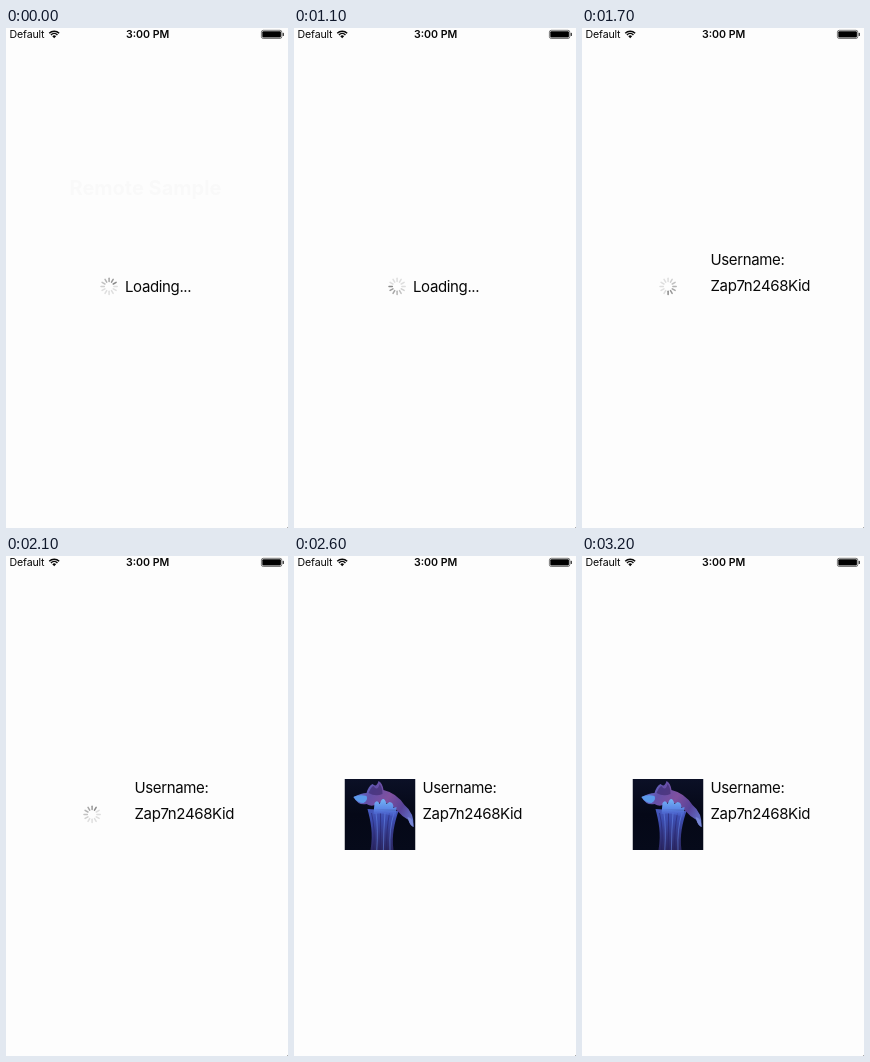
Recreate the animation shown at these times as an HTML page with a canvas. Size 282x500 px, loop 3400 ms.

```html
<!DOCTYPE html>
<html lang="en">
<head>
<meta charset="utf-8">
<title>Loading a profile</title>
<style>
  html, body { margin: 0; width: 100%; height: 100%; overflow: hidden; background: #fdfdfd; }
  canvas, svg { position: absolute; left: 0; top: 0; width: 282px; height: 500px; }
  text { font-family: Inter, "Liberation Sans", sans-serif; fill: #080808; }
  .bar { font-size: 10.6px; }
  .body { font-size: 15px; letter-spacing: -0.36px; }
</style>
</head>
<body>
<canvas id="stage"></canvas>
<svg viewBox="0 0 282 500">
  <text class="bar" x="3.5" y="10.4" letter-spacing="-0.15">Default</text>
  <text class="bar" x="141.7" y="10.4" text-anchor="middle" font-weight="600">3:00 PM</text>
  <text id="ghost" x="139.5" y="167" text-anchor="middle" font-size="20" font-weight="700" style="fill:#f9f9f9">Remote Sample</text>
  <text id="loading" class="body" x="119" y="264">Loading...</text>
  <g id="user">
    <text class="body" x="128.5" y="237.3">Username:</text>
    <text class="body" x="128.5" y="262.8">Zap7n2468Kid</text>
  </g>
</svg>
<script>
const W = 282, H = 500, LOOP = 3400, STEP = 100;
const USER_AT = 1200, PHOTO_AT = 2600;
const SPOKES = 12, SPOKES_PER_STEP = 1.78;

const $ = id => document.getElementById(id);
const canvas = $('stage');
const ctx = canvas.getContext('2d');
const ratio = window.devicePixelRatio || 1;
canvas.width = W * ratio;
canvas.height = H * ratio;
ctx.scale(ratio, ratio);

function show(id, on) {
  $(id).style.visibility = on ? 'visible' : 'hidden';
}

function box(x, y, w, h, r, color) {
  ctx.fillStyle = color;
  ctx.beginPath();
  ctx.roundRect(x, y, w, h, r);
  ctx.fill();
}

function gradient(x0, y0, x1, y1, colors) {
  const g = ctx.createLinearGradient(x0, y0, x1, y1);
  colors.forEach((c, i) => g.addColorStop(i / (colors.length - 1), c));
  return g;
}

function shape(path, fill) {
  ctx.fillStyle = fill;
  ctx.fill(new Path2D(path));
}

function statusBar() {
  // Wi-Fi fan
  const cx = 48.2, cy = 10.2, a = Math.PI * 0.25;
  ctx.strokeStyle = '#080808';
  ctx.lineWidth = 1.5;
  for (const r of [7, 4.6]) {
    ctx.beginPath();
    ctx.arc(cx, cy, r, -Math.PI + a, -a);
    ctx.stroke();
  }
  ctx.fillStyle = '#080808';
  ctx.beginPath();
  ctx.moveTo(cx, cy);
  ctx.arc(cx, cy, 2.7, -Math.PI + a, -a);
  ctx.fill();

  // Battery
  ctx.strokeStyle = '#444';
  ctx.lineWidth = 0.7;
  ctx.beginPath();
  ctx.roundRect(255.4, 2.3, 20.4, 8.2, 1.8);
  ctx.stroke();
  box(256.3, 3.2, 18.6, 6.4, 1, '#000');
  box(276.6, 4.8, 1.3, 3.2, 0.6, '#333');
}

function spinner(cx, cy, head) {
  ctx.lineWidth = 1.5;
  ctx.lineCap = 'round';
  for (let i = 0; i < SPOKES; i++) {
    const age = (head - i + SPOKES * 10) % SPOKES;
    const tone = Math.min(222, 138 + age * 14);
    const a = i / SPOKES * Math.PI * 2;
    const dx = Math.sin(a), dy = -Math.cos(a);
    ctx.strokeStyle = `rgb(${tone},${tone},${tone})`;
    ctx.beginPath();
    ctx.moveTo(cx + dx * 4.8, cy + dy * 4.8);
    ctx.lineTo(cx + dx * 8.1, cy + dy * 8.1);
    ctx.stroke();
  }
  ctx.lineCap = 'butt';
}

function photo() {
  ctx.save();
  ctx.translate(50.5, 223);
  ctx.beginPath();
  ctx.rect(0, 0, 71, 71);
  ctx.clip();
  box(0, 0, 71, 71, 0, gradient(0, 0, 0, 71, ['#0b1026', '#050817', '#060a1a']));

  // Stalk
  shape('M23 30 C26 42 29 54 26 71 L49 71 C47 56 50 44 54 32 Z',
    gradient(0, 26, 0, 71, ['#4a5fc4', '#3c4cae', '#343784', '#2b2760']));
  ctx.lineWidth = 1;
  for (let i = 0; i < 6; i++) {
    ctx.strokeStyle = i % 2 ? 'rgba(105,140,235,.55)' : 'rgba(35,30,100,.5)';
    ctx.beginPath();
    ctx.moveTo(27 + i * 4.5, 34);
    ctx.quadraticCurveTo(31 + i * 2.7, 50, 29 + i * 3.3, 71);
    ctx.stroke();
  }

  // Cap
  shape('M9 18 Q17 14 22 14 Q24 7 28 5 Q32 9 34 2 Q38 4 39 11 Q52 14 60 26 Q70 34 69 48 Q65 46 64 41 Q57 37 52 31 Q42 21 34 24 Q28 29 22 25 Q14 27 9 18 Z',
    gradient(10, 10, 68, 44, ['#5f7ddd', '#6450a8', '#80509f', '#574399', '#6478d0']));
  shape('M24 14 Q27 7 29 7 Q33 13 35 5 Q38 8 38 15 Q31 18 24 14 Z', 'rgba(62,44,112,.65)');

  // Glowing tips
  shape('M9 18 Q15 15 22 17 Q24 21 19 24 Q13 24 9 18 Z', '#5a9aeb');
  shape('M29 35 L30 24 Q33 20 35 25 L37 21 Q40 18 42 25 L45 23 Q49 23 49 29 L52 28 L51 39 Q41 33 29 35 Z',
    gradient(0, 20, 0, 39, ['#73b5f5', '#5d88e6', 'rgba(70,85,200,.3)']));
  shape('M63 38 Q69 39 69 48 Q65 46 63 38 Z', '#7887d6');
  ctx.restore();
}

function draw(t) {
  const k = Math.floor(t / STEP);
  const loaded = t >= USER_AT;
  ctx.fillStyle = '#fdfdfd';
  ctx.fillRect(0, 0, W, H);
  statusBar();
  box(281, 499, 1, 1, 0, '#aaa');

  if (t >= PHOTO_AT) photo();
  else if (loaded) spinner(86.1, 258.4, Math.floor(6.8 + (k - 17) * SPOKES_PER_STEP));
  else spinner(103.1, 258.4, Math.floor(2.4 + k * SPOKES_PER_STEP));

  show('ghost', k === 0);
  show('loading', !loaded);
  show('user', loaded);
}

function tick() {
  draw(performance.now() % LOOP);
  requestAnimationFrame(tick);
}
tick();
</script>
</body>
</html>
```
